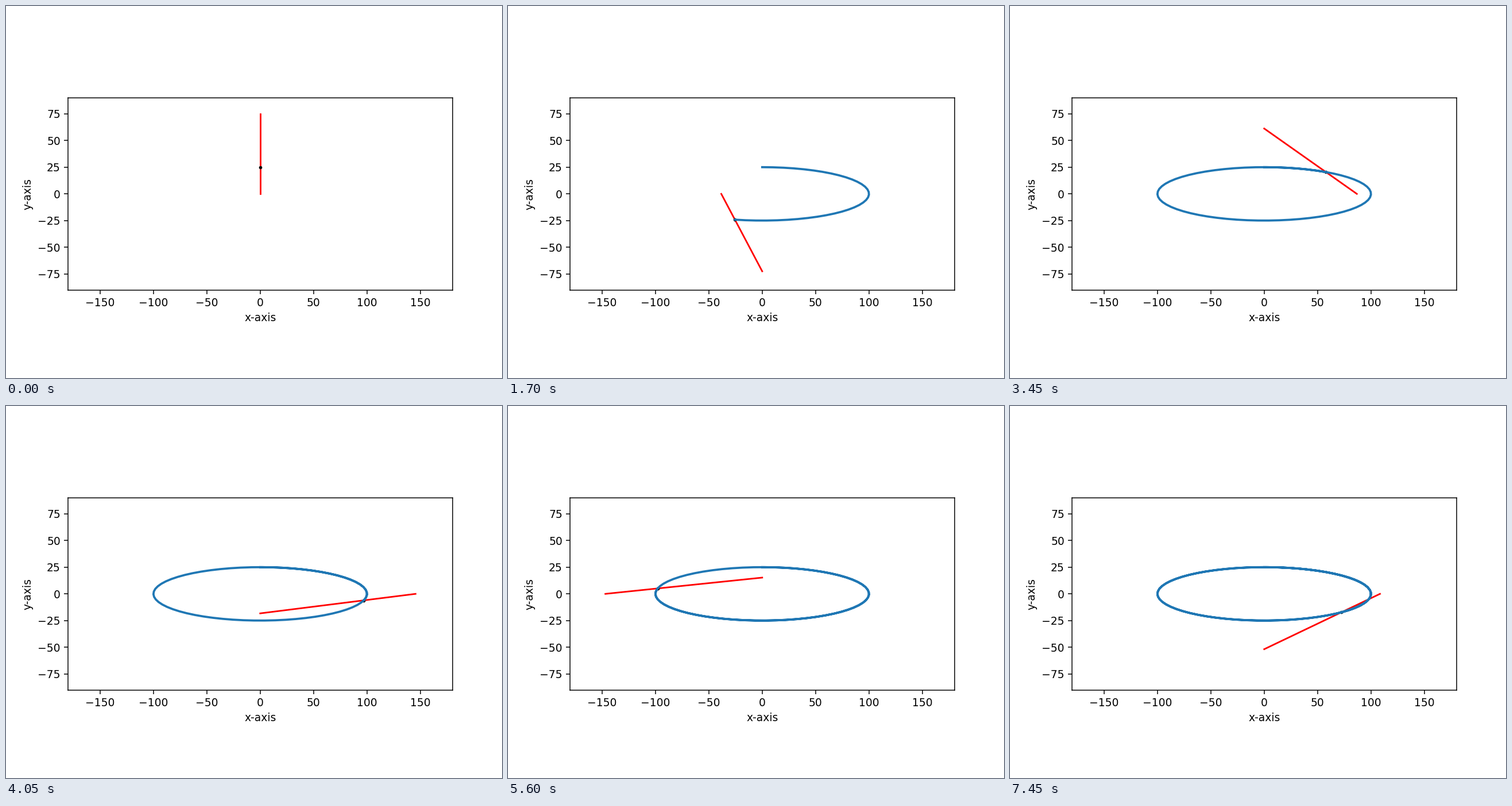
A matplotlib script that plays this animation: 864 px wide and 648 px high, repeating every 7.5 s.

```python
import numpy as np
import matplotlib.pyplot as plt
from matplotlib.animation import FuncAnimation

FRAMES, INTERVAL = 150, 50
STEP = 0.1           # radians per frame
A, B = 100, 25       # semi-axes of the traced ellipse
ROD = A + B // 2 * 4 + 2

# The rod slides along both axes; its pen sits a third of the way from the x-axis end.
X_REACH, Y_REACH = 1.5 * A, 3 * B

theta = STEP * np.arange(FRAMES)
pen_x, pen_y = A * np.sin(theta), B * np.cos(theta)

fig, ax = plt.subplots(figsize=(6.4, 4.8), dpi=135)
ax.set_aspect("equal")
ax.set_xlim(-180, 180)
ax.set_ylim(-90, 90)
ax.set_xlabel("x-axis")
ax.set_ylabel("y-axis")

rod, = ax.plot([], [], color="red", lw=1.5)
pen, = ax.plot([], [], "o", color="black", ms=2)
trail, = ax.plot([], [], color="tab:blue", lw=2)


def update(i):
    rod.set_data([0, X_REACH * np.sin(theta[i])], [Y_REACH * np.cos(theta[i]), 0])
    pen.set_data([pen_x[i]], [pen_y[i]])
    trail.set_data(pen_x[:i + 1], pen_y[:i + 1])
    return rod, pen, trail


anim = FuncAnimation(fig, update, frames=FRAMES, interval=INTERVAL,
                     repeat=True, repeat_delay=0)
plt.show()
```
